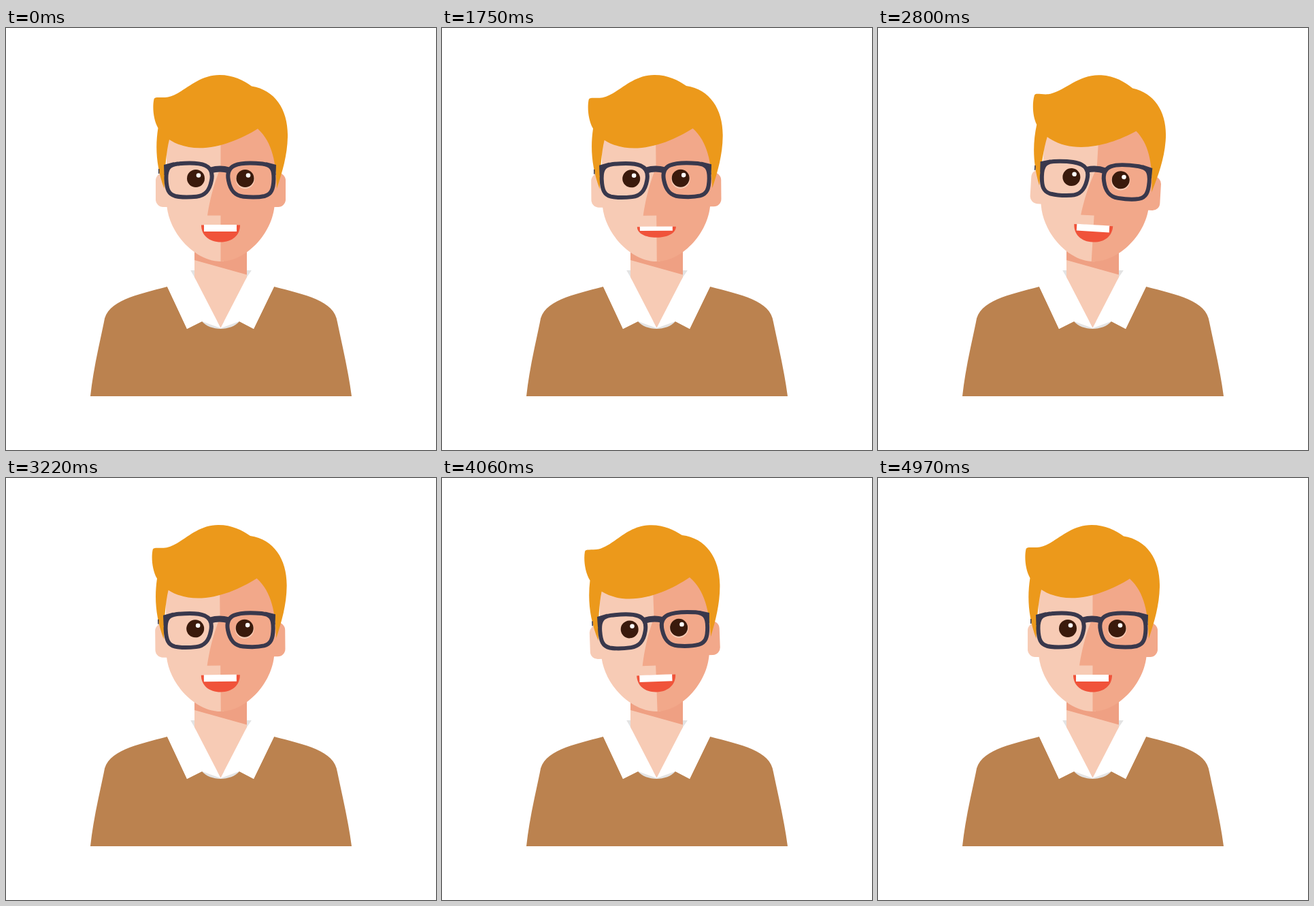
Animation of 632x620 px, one loop 5.25 s. Source, as an HTML page:

```html
<!DOCTYPE html>
<html lang="en">
<head>
<meta charset="utf-8">
<title>Talking man with glasses</title>
<style>
  html, body { margin: 0; width: 100%; height: 100%; overflow: hidden; background: #fff; }
  svg { display: block; width: 100%; height: 100%; }
  .light { fill: #f7cbb5; }
  .shade { fill: #f2a88a; }
  .frame { fill: none; stroke: #39384c; stroke-width: 6; stroke-linejoin: round; }
</style>
</head>
<body>
<svg viewBox="0 0 632 620">
  <defs>
    <g id="lens">
      <path class="frame" d="M235.500 222 C235 206 240 201 252 199.500 C268 198 284 198 293 202 C302 206 304 214 302 224 C299 240 292 246.500 280 247.800 C268 249 257 248.800 249 247 C239 244.500 236 237 235.500 222 Z"/>
      <path fill="#39384c" d="M232 201 L247 197 L239 208 L237 216 H232.500 Z"/>
    </g>
  </defs>

  <g id="body">
    <path fill="#bb824f" d="M237 380 C193 392 148 400 144 432 C137 466 128 503 124 541 H508 C503 503 494 466 487 432 C483 400 439 392 394 380 L364 442 L343 431 H288 L266 442 Z"/>
    <path fill="#e3e3e3" d="M271 356 H361 L354 370 H278 Z M288 431 C300 445.500 331 445.500 343 431 Z"/>
    <path fill="#fff" d="M277 366 L315.500 440.500 L354 366 L361 356 L394 380 L364 442 L343 431 L315.500 441 L288 431 L266 442 L237 380 L271 356 Z"/>
    <path class="light" d="M277 315 H354 V366 L315.500 440.500 L277 366 Z"/>
    <path fill="#efa083" d="M277 315 H354 V362.500 L277 341 Z"/>
  </g>

  <g id="head">
    <rect class="light" x="220" y="213" width="30" height="50" rx="11"/>
    <rect class="shade" x="381" y="213" width="30" height="50" rx="11"/>
    <path class="light" d="M236 160 V254 C236 299 277 343 315.500 343 H320 V160 Z"/>
    <path class="shade" d="M315.500 140 H395 V254 C395 299 354 343 315.500 343 V275.500 H296 C299 255 305 230 315.500 205 Z"/>

    <path fill="#ec991b" d="M217.500 104.500 C218.500 100 227 103 238 101.500 C262 96 280 69 314 69 C334 69 349 77 361 85.500 C396 91 415 121 414 160 C413.500 187 406 212 398 236 C397 199 392 168 370 148 C335 170 280 190 240 164 C235.500 182 233.500 207 232.500 236 C221 204 219 176 223.500 147 C216.500 135 215 116 217.500 104.500 Z"/>
    <rect fill="#39384c" x="224" y="207" width="1.500" height="7"/>

    <g id="eyes">
      <circle class="light" cx="351.500" cy="222.500" r="13.800"/>
      <g fill="#3a1a0c"><circle cx="279" cy="221" r="13"/><circle cx="351.500" cy="221" r="13"/></g>
      <g fill="#fff"><circle cx="283" cy="216.500" r="3.300"/><circle cx="356" cy="216.500" r="3.300"/></g>
    </g>

    <use href="#lens"/>
    <use href="#lens" transform="matrix(-1 0 0 1 629 0)"/>
    <path class="frame" d="M301 209 Q314.500 205 328 209" style="stroke-width:9"/>

    <g id="mouth">
      <path fill="#f0533a" d="M287 289.500 H344 C344 305 332 314.500 315.500 314.500 S287 305 287 289.500 Z"/>
      <rect fill="#fff" x="291" y="289" width="48" height="10"/>
    </g>
  </g>
</svg>
<script>
  const LOOP = 5250, TICK = 70;
  const [head, eyes, mouth] = ["head", "eyes", "mouth"].map(id => document.getElementById(id));

  // [time in ms, tilt in degrees], eased in and out between neighbours
  const tilts = [[0, 0], [1360, 0], [1600, -2.2], [1820, 0], [2030, 0],
                 [2590, 4], [3640, -2.9], [4830, 0], [LOOP, 0]];

  // [time in ms, openness], held until the next entry
  const FULL = 1, MID = 0.85, HALF = 0.63;
  const speech = [[0, FULL], [70, HALF], [210, FULL], [280, HALF], [420, FULL], [560, HALF],
                  [700, MID], [840, FULL], [1750, HALF], [1820, FULL], [1960, HALF],
                  [2100, FULL], [2240, HALF], [2380, MID], [2520, FULL]];
  const blinks = [[210, 350], [4830, 4970]];

  const ease = p => (1 - Math.cos(Math.PI * p)) / 2;

  function tiltAt(t) {
    const i = tilts.findIndex(([end]) => end > t);
    const [t0, a] = tilts[i - 1], [t1, b] = tilts[i];
    return a + (b - a) * ease((t - t0) / (t1 - t0));
  }

  const opennessAt = t => speech.filter(([start]) => start <= t).pop()[1];
  const squash = (y, scale) => `translate(0 ${y}) scale(1 ${scale}) translate(0 ${-y})`;

  function draw(now) {
    const t = Math.floor((now % LOOP) / TICK) * TICK;
    const closed = blinks.some(([from, to]) => t >= from && t < to);
    head.setAttribute("transform", `rotate(${tiltAt(t)} 315 312)`);
    eyes.setAttribute("transform", squash(221, closed ? 0.1 : 1));
    mouth.setAttribute("transform", squash(296, opennessAt(t)));
  }

  let start;
  function loop(now) {
    start ??= now;
    draw(now - start);
    requestAnimationFrame(loop);
  }
  draw(0);
  requestAnimationFrame(loop);
</script>
</body>
</html>
```
